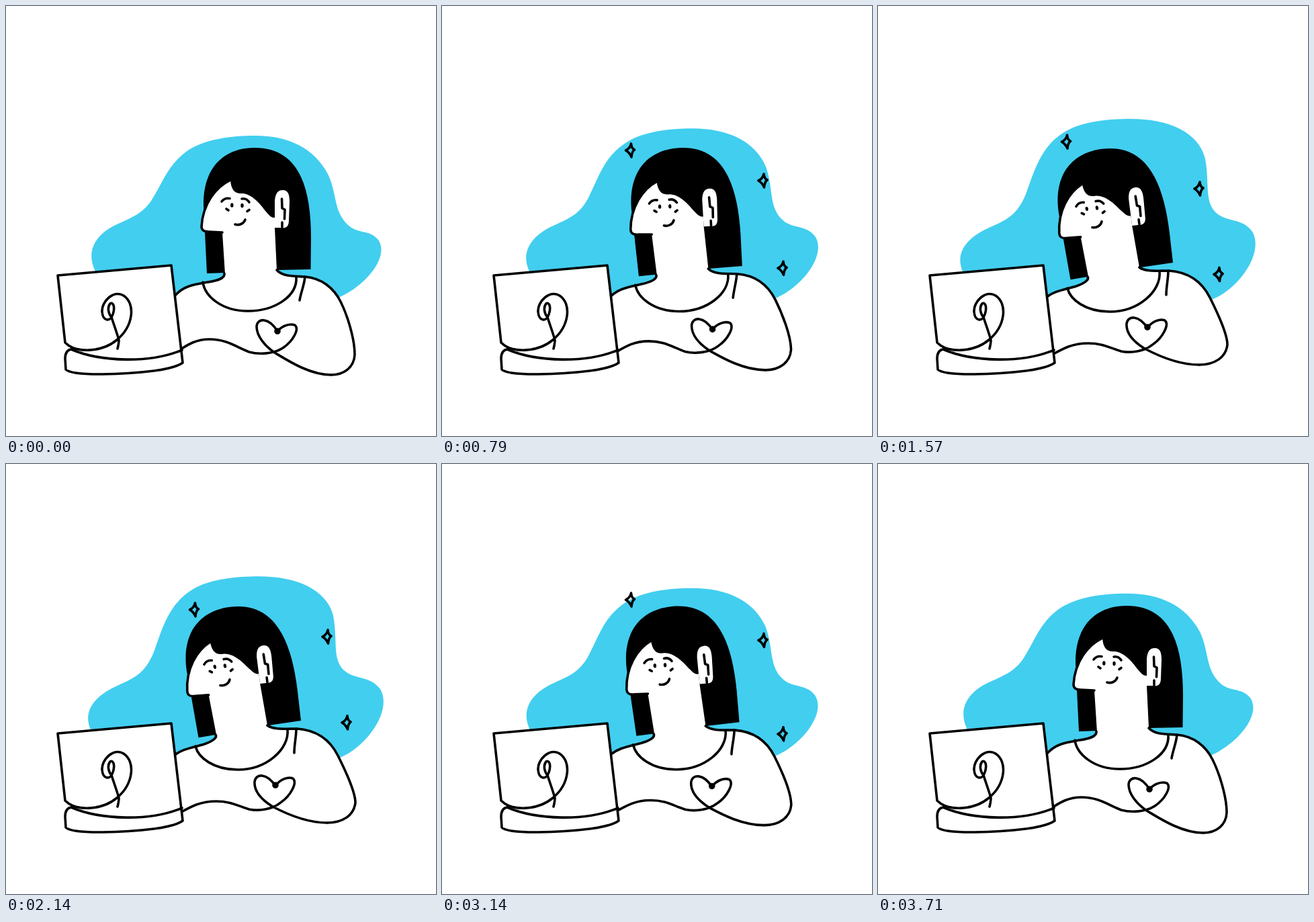
Write an HTML page that moves like this. It is 640 px wide and 640 px high and loops after 3780 ms.

```html
<!DOCTYPE html>
<html lang="en">
<head>
<meta charset="utf-8">
<title>Woman at a laptop</title>
<style>
  html, body { margin: 0; width: 100%; height: 100%; overflow: hidden; background: #fff; }
  svg { display: block; width: 100vw; height: 100vh; }
  .line { fill: none; stroke: #000; stroke-width: 3.6; stroke-linecap: round; stroke-linejoin: round; }
  .white { fill: #fff; }
</style>
</head>
<body>
<svg viewBox="0 0 640 640">
  <path id="blob" fill="#42ceef"/>
  <g id="stars"></g>
  <path id="body" class="white"/>
  <g id="head">
    <path d="M299 398L296 337L294 297C293 240 325 211 370 211C434 211 454 266 454 345L453.500 392L403 393L326 397Z"/>
    <path class="white" d="M334 259C312 269 293 295 291 328C291 335 296 336 302 336L322 337L326 399L328 412L403 408L403 393L400 330V315C394 316 390 309 386 305C378 294 366 280 352 279C340 280 335 273 334 259Z"/>
    <path class="white" d="M400 316V290C401 278 405 274 412 274C420 274 422 281 422 291L421 319C421 328 417 331 411 330H400Z"/>
    <g class="line">
      <path d="M334 259C312 269 293 295 291 328C291 335 296 336 302 336L322 337"/>
      <path d="M410.500 287L411 301L415 303L414.500 317M411 322V329"/>
      <path d="M321 291C324 287 328 285.500 333 286.500M351 287C356 286 360 289 362 292"/>
      <path d="M328 302L331 304M359 305.500L362 303.500M341 325C347 327 354 324 356 318"/>
    </g>
    <ellipse cx="336.300" cy="296.500" rx="2.200" ry="3.200"/>
    <ellipse cx="351.500" cy="297" rx="2.200" ry="3.200"/>
  </g>
  <g id="lines" class="line"></g>
  <g id="laptop" class="line">
    <path class="white" stroke="none" d="M77 401L246 386L263 531C245 545 115 553 89 541L88 520L96 511L88 501Z"/>
    <path d="M97 511C90 512 88 517 88 525L89 541C100 552 180 548 220 543C243 540 256 536 263 531L246 386L77 401L88 501C104 517 142 516 165 497C190 476 193 443 175 431C160 422 142 440 143 455C144 469 155 471 159 459C163 447 159 440 155 443C150 449 153 459 157 463C159 470 165 486 168 497C168 501 167 506 166 510"/>
    <path d="M97 511C141 530 215 532 262 512"/>
  </g>
  <path id="sparks" class="line" style="stroke-width:2.200"/>
</svg>
<script>
const FRAMES = 53, LOOP = 3780;
const $ = id => document.getElementById(id);
const clamp = x => Math.min(1, Math.max(0, x));
const smooth = x => (x = clamp(x)) * x * (3 - 2 * x);
const wave = (f, peak, period) => Math.cos(2 * Math.PI * (f - peak) / period);

// Blends two path strings that share the same commands.
function mix([a, b], k) {
  const ends = b.match(/-?[\d.]+/g);
  let i = 0;
  return a.replace(/-?[\d.]+/g, n => +(+n + (ends[i++] - n) * k).toFixed(2));
}

// Each shape: upright pose, leaning pose.
const blob = [
  'M136 400C116 368 132 340 165 325C187 315 203 309 216 290C234 262 240 238 268 217C294 198 336 193 371 193C421 193 459 212 479 250C493 279 487 304 508 325C523 340 541 332 554 348C571 372 537 415 497 433L480 450L140 450Z',
  'M128 400C111 368 133 344 168 329C190 319 207 312 220 280C234 240 244 205 282 184C306 171 342 167 376 167C434 167 477 187 487 225C494 262 485 290 503 307C520 322 541 314 557 335C576 367 536 422 497 437L480 450L140 450Z'];
const shoulder = [
  'M250 433C263 416 283 414 300 411C313 409 326 406 325 398',
  'M250 434C262 424 278 422 295 417C306 413 315 408 312 403'];
const arm = [
  'M403 393C412 403 428 402 445 403C470 405 488 420 498 440C508 460 519 495 519 519C518 538 503 549 484 549',
  'M389 389C398 396 416 394 433 394C462 396 482 410 494 434C506 458 520 488 520 504C518 523 501 534 478 534'];
const heart = [
  'M484 549C452 549 420 528 400 516C385 506 373 491 373 477C374 464 391 463 404 484C411 476 422 472 430 475C437 481 427 499 412 509C398 518 377 519 362 515C342 507 328 496 303 496C284 496 272 502 250 518',
  'M478 534C446 534 416 520 397 510C381 500 369 488 370 473C372 460 388 460 401 479C408 469 420 465 427 468C434 474 424 493 410 503C397 514 377 517 362 514C343 508 334 502 313 502C290 502 278 508 250 524'];
const knot = [
  'M401 484a3 3 0 1 0 6 0a3 3 0 1 0 -6 0',
  'M398 478a3 3 0 1 0 6 0a3 3 0 1 0 -6 0'];
const collar = [
  'M293 411C296 432 321 454 360 454C400 454 434 432 432 403',
  'M282 420C286 437 309 455 345 455C388 455 422 424 419 395'];
const strap = [
  'M445 403C444 415 439 426 437 438',
  'M432 394C432 406 429 418 429 430'];
const lines = [shoulder, arm, heart, knot, collar, strap];

const stars = [
  { x: 280, y: 208.5, amp: 8.5, peak: 30.5, period: 22 },
  { x: 477.5, y: 264.5, amp: 7.5, peak: 22, period: 17 },
  { x: 506.5, y: 393, amp: 9, peak: 18.8, period: 26 }];
const sparks = [[80, 364, 70, 340], [119, 361, 131, 338], [50, 392, 24, 381]];

function add(parent, d) {
  const path = document.createElementNS('http://www.w3.org/2000/svg', 'path');
  path.setAttribute('class', 'line');
  path.setAttribute('d', d);
  return parent.appendChild(path);
}
const linePaths = lines.map(() => add($('lines'), ''));
const starPaths = stars.map(() => add($('stars'),
  'M1.500 -10Q2 -3 6.500 -1Q2.500 2 2 10Q-1 3 -6.500 0Q0 -3 1.500 -10Z'));

function draw(f) {
  const swell = f < 27 ? smooth(f / 25) : smooth((FRAMES - f) / 24);
  const lean = smooth((f - 3) / 16.5) - smooth((f - 41.2) / 8.8);
  const tilt = f < 10 ? 3.9 * (1 - Math.cos(f * Math.PI / 5)) : 0;

  $('blob').setAttribute('d', mix(blob, swell));
  $('body').setAttribute('d', mix(shoulder, lean) + mix(arm, lean).replace('M', 'L') + 'L250 549Z');
  linePaths.forEach((path, i) => path.setAttribute('d', mix(lines[i], lean)));
  $('head').setAttribute('transform', `rotate(${-7.2 * lean} 366 502)`);
  $('laptop').setAttribute('transform', `rotate(${tilt} 176 537)`);

  const size = smooth((f - 6) / 4) - smooth((f - 48) / 3);
  stars.forEach((s, i) => {
    const y = s.y + s.amp * wave(f, s.peak, s.period);
    starPaths[i].setAttribute('transform', `translate(${s.x} ${y}) scale(${size})`);
    starPaths[i].style.display = size > 0 ? '' : 'none';
  });

  const tip = clamp((f - 1) / 3), tail = clamp((f - 2) / 3.5);
  $('sparks').setAttribute('d', tip > tail ? sparks.map(([x, y, u, v]) =>
    `M${x + (u - x) * tail} ${y + (v - y) * tail}L${x + (u - x) * tip} ${y + (v - y) * tip}`).join('') : '');
}

function tick() {
  const t = performance.now() % LOOP;
  draw(Math.min(FRAMES - 1, Math.floor((t + 5) * 0.014)));
  requestAnimationFrame(tick);
}
tick();
</script>
</body>
</html>
```
